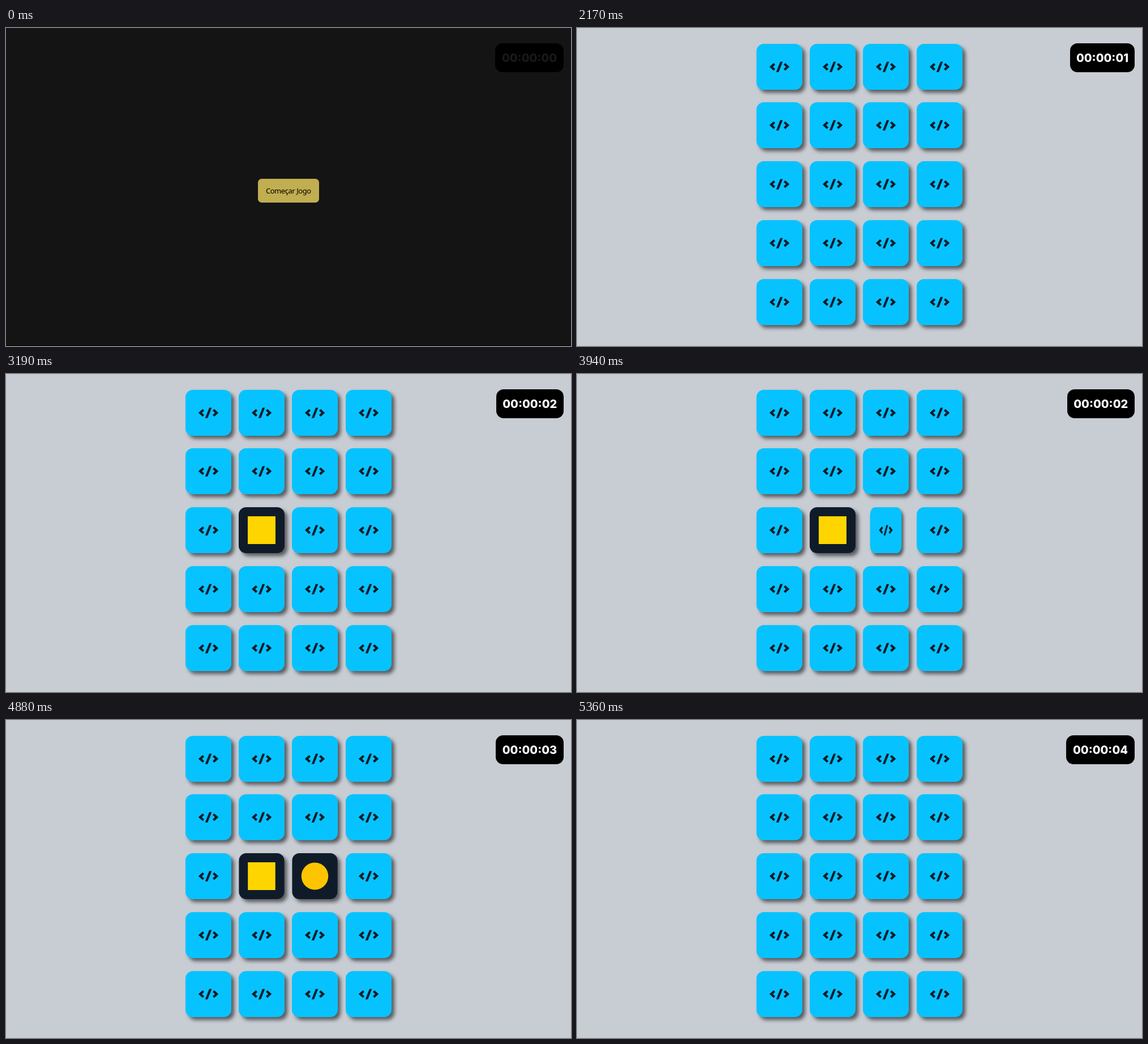
An HTML page for the animation above (6.08 s loop, 998 by 561 pixels).

```html
<!DOCTYPE html>
<html lang="pt">
<head>
<meta charset="utf-8">
<title>Jogo da memória</title>
<style>
  html, body { margin: 0; width: 100%; height: 100%; overflow: hidden; background: #c8ccd3; }
  div { position: absolute; box-sizing: border-box; }
  .card {
    width: 81px; height: 81px; border-radius: 13px;
    background: #06c3ff; box-shadow: 5.2px 5.2px 6.5px rgba(0, 0, 0, .55);
  }
  .card svg { display: block; width: 100%; height: 100%; }
  .card .logo { display: none; }
  .card.open { background: #101b2a; }
  .card.open .logo { display: block; }
  .card.open .code { display: none; }
  #timer {
    right: 13px; top: 26.5px; height: 51.5px; border-radius: 13px;
    background: #000; color: #fff; text-align: center; white-space: nowrap;
    font: 800 20px/52px Inter, sans-serif;
  }
  #cover { inset: 0; background: rgba(0, 0, 0, .9); border-bottom: 1px solid #000; }
  #start {
    left: 445px; top: 266px; width: 107.5px; height: 42px; border-radius: 6.5px;
    background: #c0ae50; color: #000; text-align: center; white-space: nowrap;
    font: 13px/42px "Noto Sans", sans-serif; letter-spacing: -.45px;
  }
</style>
</head>
<body>
<div id="board"></div>
<div id="timer"></div>
<div id="cover"><div id="start">Começar Jogo</div></div>
<script>
const LOOP = 6080, START = 1180, STEPS = 7, FLIP = 480;
const board = document.getElementById('board');
const timer = document.getElementById('timer');
const cover = document.getElementById('cover');
const ticks = [2170, 3190, 4150, 5160];
const timerWidths = [121, 114, 119.5, 120, 121];

const code = `<g class="code" fill="none" stroke="#101b2a" stroke-width="4.2">
  <path d="M31.8 35.2L26 40.5L31.8 45.8M49.4 35.2L55.2 40.5L49.4 45.8"/>
  <path d="M42 31.4h4.4L39.2 49.8H34.8z" fill="#101b2a" stroke="none"/></g>`;
const logos = {
  9: '<rect class="logo" x="16" y="16" width="49" height="49" fill="#ffd500"/>',
  10: '<circle class="logo" cx="40.5" cy="40.5" r="24" fill="#ffc400"/>'
};

const cards = Array.from({ length: 20 }, (_, i) => {
  const card = document.createElement('div');
  card.className = 'card';
  card.style.left = 317 + 94.2 * (i % 4) + 'px';
  card.style.top = 27.6 + 103.75 * Math.floor(i / 4) + 'px';
  card.innerHTML = `<svg viewBox="0 0 81 81">${code}${logos[i] || ''}</svg>`;
  board.append(card);
  return card;
});

// The CSS "ease" curve, cubic-bezier(.25, .1, .25, 1)
function ease(x) {
  const bezier = (a, b, s) => 3 * (1 - s) * s * (a * (1 - s) + b * s) + s ** 3;
  let lo = 0, hi = 1;
  for (let i = 0; i < 24; i++) {
    const mid = (lo + hi) / 2;
    if (bezier(.25, .25, mid) < x) lo = mid; else hi = mid;
  }
  return bezier(.1, 1, lo);
}

// Share of a half-second turn, sampled in even steps
function turn(t, from, lead) {
  const step = Math.floor((t - from) / FLIP * STEPS + 1e-6);
  if (step < 0) return 0;
  return step >= STEPS ? 1 : ease((step * 70 + lead) / 500);
}

function pose(card, share) {
  const c = Math.cos(Math.PI * share);
  card.classList.toggle('open', c < 0);
  card.style.transform = share % 1 ? `scaleX(${Math.abs(c)})` : 'none';
}

function draw(t) {
  const playing = t >= START;
  board.style.display = playing ? 'block' : 'none';
  cover.style.display = playing ? 'none' : 'block';

  const seconds = ticks.filter(tick => t >= tick).length;
  timer.textContent = '00:00:0' + seconds;
  timer.style.width = timerWidths[seconds] + 'px';

  const back = turn(t, 4880, 31);
  pose(cards[9], turn(t, 2440, 11) - back);
  pose(cards[10], turn(t, 3870, 22) - back);
}

const origin = performance.now();
function frame() {
  draw((performance.now() - origin) % LOOP);
  requestAnimationFrame(frame);
}
draw(0);
requestAnimationFrame(frame);
</script>
</body>
</html>
```
